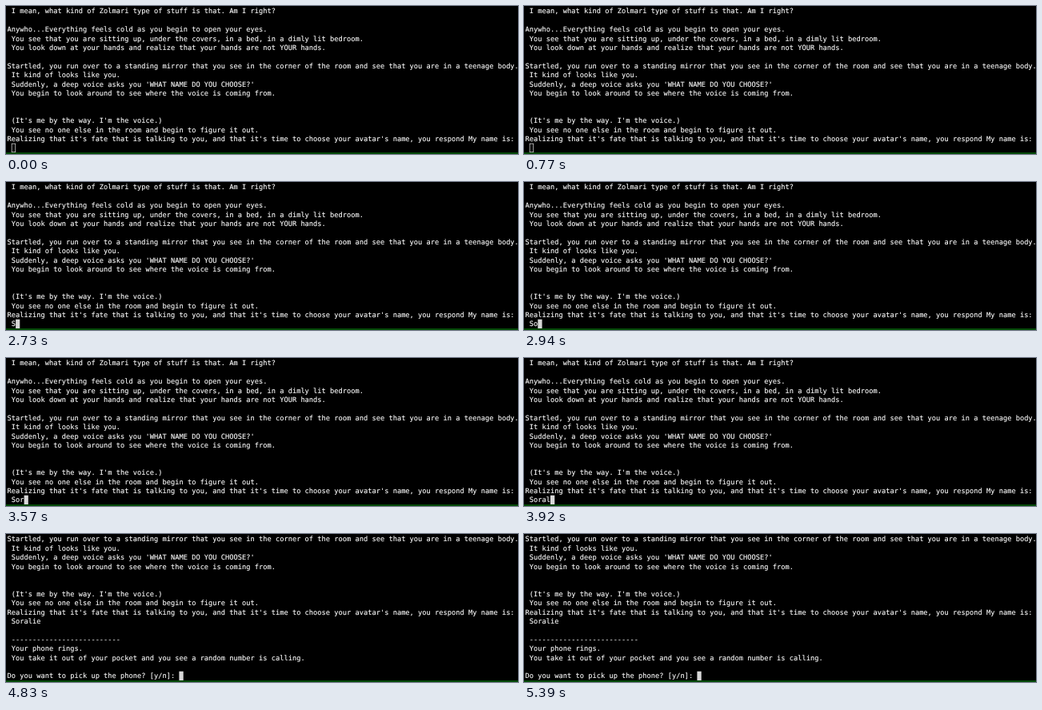
Animation, 640 px wide and 185 px high, one loop 8000 ms. Source, as an HTML page:

```html
<!DOCTYPE html>
<html lang="en">
<head>
<meta charset="utf-8">
<title>Terminal story</title>
<style>
  :root { --loop: 8s step-end infinite; --line: 114px; }
  html, body { margin: 0; width: 100%; height: 100%; overflow: hidden; background: #000; }
  .stage { position: relative; width: 640px; height: 185px; overflow: hidden; background: #000; }

  /* Set at ten times the size and scaled down, for exact fractional spacing */
  .screen {
    position: absolute; left: 0; top: 0;
    transform: translate(1.6px, .7px) scale(.1); transform-origin: 0 0;
  }
  pre {
    margin: 0; color: #fff; -webkit-text-stroke: 1.2px #fff;
    font: 87.04px/var(--line) "DejaVu Sans Mono", monospace;
    font-variant-ligatures: none; text-rendering: geometricPrecision;
    animation: scroll var(--loop);
  }
  .typed, .cursor { display: inline-block; height: var(--line); vertical-align: top; }
  .typed { overflow: hidden; animation: type var(--loop); }
  .cursor { width: 1ch; box-sizing: border-box; background: #d8d8d8; }
  .name { animation: focus var(--loop); }
  .bar { position: absolute; left: 0; right: 0; bottom: 0; height: 2px; background: #054a08; }

  @keyframes scroll {
    0% { transform: none; }
    60.375%, 100% { transform: translateY(calc(-6 * var(--line))); }
  }
  @keyframes type {
    0% { width: 0; }
    29.75% { width: 1ch; }
    35.875% { width: 2ch; }
    44.625% { width: 3ch; }
    47.25% { width: 4ch; }
    49% { width: 5ch; }
    50.75% { width: 6ch; }
    53.375%, 100% { width: 7ch; }
  }
  @keyframes focus {
    0% { background: none; border: 8px solid #d0d0d0; }
    14% { background: #b0b0b0; border: 0 solid #b0b0b0; }
    29.75% { background: #d8d8d8; border: 0 solid #d8d8d8; visibility: visible; }
    60.375%, 100% { visibility: hidden; }
  }
</style>
</head>
<body>
<div class="stage">
  <div class="screen"><pre> I mean, what kind of Zolmari type of stuff is that. Am I right?

Anywho...Everything feels cold as you begin to open your eyes.
 You see that you are sitting up, under the covers, in a bed, in a dimly lit bedroom.
 You look down at your hands and realize that your hands are not YOUR hands.

Startled, you run over to a standing mirror that you see in the corner of the room and see that you are in a teenage body.
 It kind of looks like you.
 Suddenly, a deep voice asks you 'WHAT NAME DO YOU CHOOSE?'
 You begin to look around to see where the voice is coming from.


 (It's me by the way. I'm the voice.)
 You see no one else in the room and begin to figure it out.
Realizing that it's fate that is talking to you, and that it's time to choose your avatar's name, you respond My name is:
 <span class="typed">Soralie</span><span class="cursor name"></span>

 --------------------------
 Your phone rings.
 You take it out of your pocket and you see a random number is calling.

Do you want to pick up the phone? [y/n]: <span class="cursor"></span></pre></div>
  <div class="bar"></div>
</div>
</body>
</html>
```
